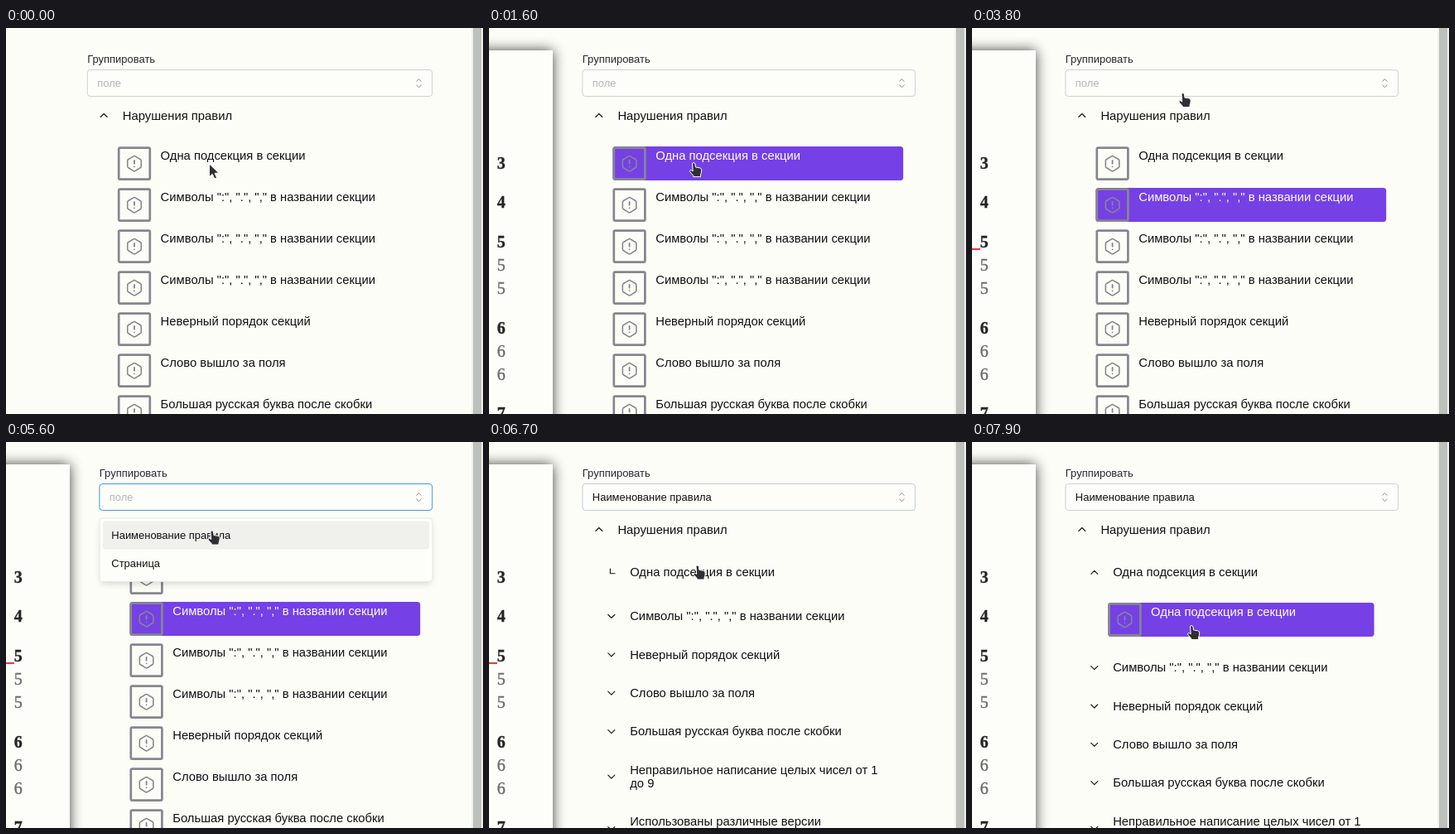
An HTML page for the animation above (8 s loop, 576x466 px).

```html
<!DOCTYPE html>
<html lang="ru">
<head>
<meta charset="utf-8">
<title>Нарушения правил</title>
<style>
html, body { margin: 0; width: 100%; height: 100%; overflow: hidden; background: #fdfdf8; }
svg { display: block; width: 576px; height: 466px; }
text { font: 14.8px "Liberation Sans", Arial, sans-serif; fill: #101012; white-space: pre; }
text.small { font-size: 12.97px; }
text.num { font: 20px "Liberation Serif", serif; fill: #6a6a6a; stroke: #6a6a6a; stroke-width: .4; text-anchor: middle; }
text.bold { font-weight: bold; fill: #262626; stroke: #262626; }
.line { fill: none; stroke-linecap: round; stroke-linejoin: round; }
</style>
</head>
<body>
<svg id="stage" viewBox="0 0 576 466">
  <defs>
    <filter id="soft" x="-50%" y="-20%" width="200%" height="140%"><feGaussianBlur stdDeviation="8"/></filter>
    <filter id="lift" x="-10%" y="-20%" width="120%" height="150%"><feGaussianBlur stdDeviation="4"/></filter>
    <clipPath id="fold"><rect id="foldBox" x="100" y="180.5" width="420" height="0"/></clipPath>
    <g id="badge" class="line" stroke="#85878c">
      <rect x="1.4" y="1.5" width="37.6" height="38" rx="1.5" stroke-width="2.7"/>
      <g transform="translate(9.2 9.6) scale(.916)" stroke-width="1.7">
        <path d="M19.9 6.3c.7.4 1.1 1.1 1.1 1.9v7.3c0 .8-.4 1.6-1.2 2l-6.7 4.2a2.3 2.3 0 0 1-2.2 0l-6.7-4.2a2.2 2.2 0 0 1-1.2-2v-7.3c0-.8.4-1.5 1.2-1.9l6.7-4a2.3 2.3 0 0 1 2.2 0z"/>
        <path d="M12 8v4M12 16h.01" stroke-width="2"/>
      </g>
    </g>
    <path id="chevron" class="line" d="M-4 -2L0 2L4 -2" stroke="#161616" stroke-width="1.15"/>
  </defs>
  <rect width="576" height="466" fill="#fdfdf8"/>
  <rect x="562" width="14" height="466" fill="#f1f2ed"/>
  <rect x="564" width="10" height="466" fill="#bec0bb"/>
  <g id="page">
    <rect x="-60" y="27" width="137" height="480" fill="#000" opacity=".75" filter="url(#soft)"/>
    <rect x="-60" y="27" width="137" height="480" fill="#fdfefa"/>
    <rect id="mark" y="266" width="10" height="2" fill="#ee3350"/>
  </g>
  <g id="header">
    <text class="small" x="98.2" y="42.3" style="fill:#25282c">Группировать</text>
    <use href="#chevron" transform="translate(118.2 105.5) rotate(180)"/>
    <text x="140.8" y="111">Нарушения правил</text>
  </g>
  <g id="rows"></g>
  <g id="groups">
    <g clip-path="url(#fold)">
      <g id="nested"></g>
    </g>
  </g>
  <rect id="field" y="50.5" height="32" rx="3.6" fill="#fdfdf9"/>
  <text id="value" class="small" y="71"></text>
  <path class="line" d="M495.8 64.3l2.7-2.6l2.7 2.6M495.8 69l2.7 2.6l2.7-2.6" stroke="#85898d" stroke-width="1"/>
  <g id="menu">
    <rect x="115" y="97" width="398" height="74" fill="#000" opacity=".16" filter="url(#lift)"/>
    <rect x="113" y="92" width="402" height="76.5" rx="3.6" fill="#fdfdfa" stroke="#e6e8e4" stroke-width=".9"/>
    <rect x="117" y="95.5" width="394" height="34" rx="3.6" fill="#f0f1ed"/>
    <text class="small" x="127.3" y="116.5">Наименование правила</text>
    <text class="small" x="127.3" y="150.5">Страница</text>
  </g>
  <g id="cursor" stroke="#fff" stroke-width="1" stroke-linejoin="round">
    <path id="arrow" d="M0 0V15.6L3.7 12.4L6.4 18L9.1 16.8L6.6 11.4L11.4 11Z" fill="#303034"/>
    <path id="hand" fill="#303034" d="M-2 2Q-1.9 .6 -.4 .6Q1.1 .6 1.4 2L2 6L7 6.8Q9.4 7.3 9.2 9.8Q9.1 13 8 15.2V17.6H-.8V16.2L-4.6 12Q-5.5 10.4 -4.3 9.6Q-3.2 9.2 -1.3 11Z"/>
  </g>
</svg>
<script>
const PERIOD = 8000, SHIFT = 14.6;
const $ = id => document.getElementById(id);
const RULES = [
  'Одна подсекция в секции',
  'Символы ":", ".", "," в названии секции',
  'Неверный порядок секций',
  'Слово вышло за поля',
  'Большая русская буква после скобки'
];
const EVENTS = {
  first: 450, page: 600, second: 3000, mark: 3150, open: 5050,
  grouped: 5660, blur: 6635, unfold: 6662, third: 7680, unmark: 7760
};

function add(parent, tag, attrs, content) {
  const el = document.createElementNS('http://www.w3.org/2000/svg', tag);
  for (const key in attrs) el.setAttribute(key, attrs[key]);
  if (content) el.textContent = content;
  return parent.appendChild(el);
}
const show = (el, on) => el.setAttribute('display', on ? 'inline' : 'none');
const move = (el, x, y, turn = 0) => el.setAttribute('transform', `translate(${x} ${y}) rotate(${turn})`);
const smooth = (t, start, length) => {
  const p = Math.min(1, Math.max(0, (t - start) / length));
  return p * p * (3 - 2 * p);
};

function addRow(parent, x, y, label) {
  const g = add(parent, 'g', {});
  const fill = add(g, 'rect', { x, y, height: 41, rx: 3.6, fill: '#7540e6' });
  add(g, 'use', { href: '#badge', x, y });
  const text = add(g, 'text', { x: x + 51.8, y: y + 15.9 }, label);
  return (on, width) => {
    show(fill, on);
    fill.setAttribute('width', width);
    text.style.fill = on ? '#fff' : '';
  };
}

// Page numbers of the document preview
[['3', 170, 1], ['4', 217, 1], ['5', 265, 1], ['5', 293], ['5', 321], ['6', 369, 1], ['6', 397], ['6', 425], ['7', 472, 1]]
  .forEach(([n, y, bold]) => add($('page'), 'text', { x: 14.8, y, class: bold ? 'num bold' : 'num' }, n));

const rows = [0, 1, 1, 1, 2, 3, 4].map((rule, i) => addRow($('rows'), 134.8, 143.1 + 50 * i, RULES[rule]));
const nested = addRow($('nested'), 164.3, 193.9, RULES[0]);

const groups = [
  ...RULES.map((rule, i) => [157 + 46.35 * i, rule]),
  [397, 'Неправильное написание целых чисел от 1', 'до 9'],
  [459.5, 'Использованы различные версии', 'слова']
].map(([y, ...lines]) => {
  const g = add($('groups'), 'g', {});
  const chevron = add(g, 'use', { href: '#chevron' });
  move(chevron, 147.8, .3);
  lines.forEach((line, i) => add(g, 'text', { x: 170.2, y: 5 + 16.6 * (i - (lines.length - 1) / 2) }, line));
  return { g, y, chevron };
});

const PATH = [
  [0, 245.5, 164], [100, 245.5, 164], [600, 247.5, 162], [1900, 247.5, 162], [2600, 246, 214], [3250, 247, 213],
  [3800, 255, 78], [4100, 254, 68], [4900, 254, 68], [5450, 249, 106.5], [5800, 249, 106.5],
  [6450, 252, 148.5], [6850, 252, 148.5], [7500, 265.5, 221], [PERIOD, 265.5, 221]
];
function cursorAt(t) {
  const i = PATH.findIndex(key => key[0] > t);
  const [t0, x0, y0] = PATH[i - 1], [t1, x1, y1] = PATH[i];
  const p = smooth(t, t0, t1 - t0);
  return [x0 + (x1 - x0) * p, y0 + (y1 - y0) * p];
}

const mix = (a, b, p) => `rgb(${a.map((v, i) => Math.round(v + (b[i] - v) * p))})`;
const GRAY = [206, 209, 212], BLUE = [62, 155, 212];

function draw(t) {
  const since = name => t >= EVENTS[name];
  const dx = since('page') ? SHIFT : 0;
  const grouped = since('grouped');

  show($('page'), since('page'));
  show($('mark'), since('mark') && !since('unmark'));
  move($('header'), dx, 0);
  move($('rows'), dx, 0);
  show($('rows'), !grouped);
  show($('groups'), grouped);

  const selected = since('second') ? 1 : since('first') ? 0 : -1;
  rows.forEach((paint, i) => paint(i === selected, 365.4 - dx));

  const unfold = smooth(t, EVENTS.unfold, 200), rise = 69 * unfold;
  groups.forEach(({ g, y }, i) => move(g, 0, i ? y + rise : y));
  move(groups[0].chevron, 147.8, .3, 180 * smooth(t, EVENTS.blur, 200));
  $('foldBox').setAttribute('height', rise);
  $('nested').setAttribute('opacity', unfold);
  nested(since('third'), 321.3);

  const focus = since('open') ? 1 - smooth(t, EVENTS.blur, 80) : 0;
  const field = $('field');
  field.setAttribute('x', 98.3 + dx);
  field.setAttribute('width', 416.4 - dx);
  field.setAttribute('stroke', mix(GRAY, BLUE, focus));
  $('value').setAttribute('x', 110.2 + dx);
  $('value').textContent = grouped ? 'Наименование правила' : 'поле';
  $('value').style.fill = grouped ? '#101012' : '#b3b6b7';

  show($('menu'), since('open') && !grouped);
  $('menu').setAttribute('opacity', smooth(t, EVENTS.open, 150));

  const pointing = t >= 300 && !(t >= 2100 && t < 2850);
  show($('hand'), pointing);
  show($('arrow'), !pointing);
  move($('cursor'), ...cursorAt(t));
}

const begin = performance.now();
function tick() {
  draw((performance.now() - begin) % PERIOD);
  requestAnimationFrame(tick);
}
tick();
</script>
</body>
</html>
```
